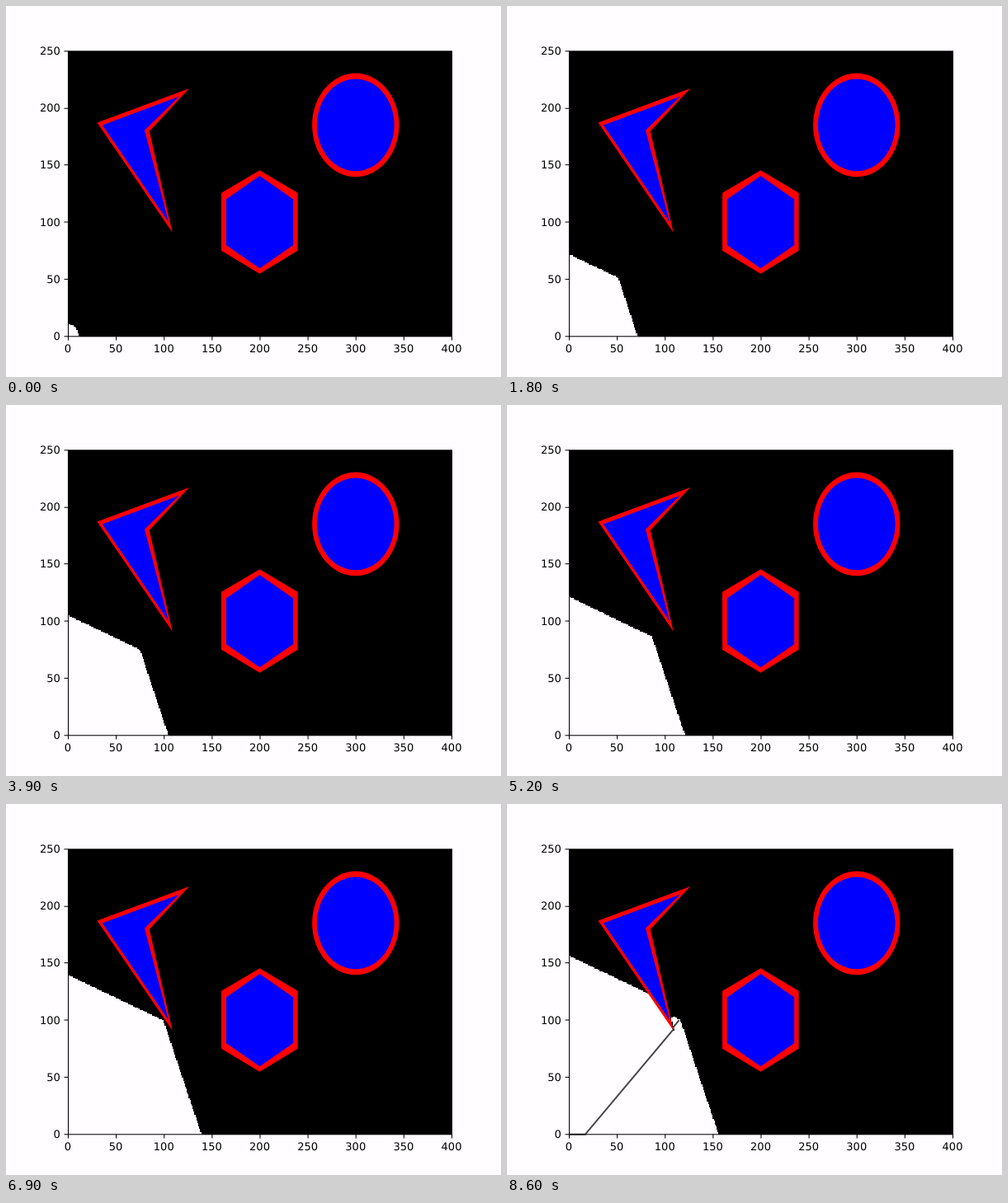
Write an HTML page with a canvas that moves like this. It is 600 px wide and 450 px high and loops after 9700 ms.

```html
<!DOCTYPE html>
<html lang="en">
<head>
<meta charset="utf-8">
<title>Shortest path search</title>
<style>
  html, body { margin: 0; width: 100%; height: 100%; overflow: hidden; background: #fffdff; }
  canvas { position: absolute; left: 75px; top: 54px; width: 465px; height: 347px; clip-path: inset(1px 0 0 0); image-rendering: pixelated; background: #000; }
  svg { position: absolute; left: 0; top: 0; }
  text { font: 13.02px "DejaVu Sans", sans-serif; text-rendering: geometricPrecision; }
</style>
</head>
<body>
<canvas id="grid" width="400" height="250"></canvas>
<svg width="600" height="450" viewBox="0 0 600 450">
  <g transform="translate(75 400.8) scale(1.1625 -1.386)">
    <g fill="#f00">
      <polygon id="arrow" points="30.5,187 126.5,217 85,179.5 109,91"/>
      <polygon points="200,145.5 239.7,125.5 239.7,75 200,54.8 160,75 160,125.5"/>
      <circle cx="300" cy="185" r="45.3"/>
    </g>
    <g fill="#00f">
      <polygon points="36,185 116,210 80,180.5 105,100"/>
      <polygon points="200,140.5 235,120 235,80 200,59.5 165,80 165,120"/>
      <circle cx="300" cy="185" r="40.3"/>
    </g>
    <polyline id="route" points="0,0 17,0 109,92 109,94 115,100" fill="none"
      stroke="#444" stroke-width="2" vector-effect="non-scaling-stroke"/>
  </g>
  <rect x="75.47" y="54.84" width="465" height="345.94" fill="none" stroke="#000" stroke-width="1.04"/>
  <g id="ticks" stroke-width="1.04"></g>
</svg>
<script>
const W = 400, H = 250, STEP = 100, LOOP = 9700, LAST = 86;
const GOAL = 100 * W + 115;
const STRAIGHT = 10, DIAGONAL = 14;
const ctx = document.getElementById('grid').getContext('2d');
const route = document.getElementById('route');

// The plot was laid out on a 640 pixel wide grid and scaled to 600.
const snap = p => (Math.round(p / 0.9375) + 0.5) * 0.9375;

function drawTicks() {
  let out = '';
  for (let v = 0; v <= W; v += 50) {
    const x = 75 + v * 1.1625;
    out += `<path d="M${snap(x)} 400.8v4.6" stroke="#000"/><text x="${x}" y="419.7" text-anchor="middle">${v}</text>`;
  }
  for (let v = 0; v <= H; v += 50) {
    const y = 400.5 - v * 1.386;
    out += `<path d="M75.4 ${snap(y)}h-4.9" stroke="#000"/><text x="65.9" y="${y + 4.7}" text-anchor="end">${v}</text>`;
  }
  document.getElementById('ticks').innerHTML = out;
}

// Dijkstra with buckets as wide as the cheapest edge, so a bucket never feeds itself.
function searchOrder() {
  const obstacle = new Path2D('M' + document.getElementById('arrow').getAttribute('points') + 'Z');
  const cost = new Float64Array(W * H).fill(Infinity);
  const done = new Uint8Array(W * H);
  const buckets = [[0]], order = [];
  cost[0] = 0;
  for (let b = 0; b < buckets.length; b++) {
    const cells = (buckets[b] || []).sort((p, q) => cost[p] - cost[q] || p % W - q % W);
    for (const cell of cells) {
      if (done[cell]) continue;
      done[cell] = 1;
      order.push(cell);
      if (cell === GOAL) return order;
      const cx = cell % W, cy = Math.floor(cell / W);
      for (let dy = -1; dy <= 1; dy++) for (let dx = -1; dx <= 1; dx++) {
        const x = cx + dx, y = cy + dy, next = y * W + x;
        if (x < 0 || y < 0 || x >= W || y >= H || done[next]) continue;
        const total = cost[cell] + (dx && dy ? DIAGONAL : STRAIGHT);
        if (total >= cost[next] || ctx.isPointInPath(obstacle, x, y)) continue;
        cost[next] = total;
        (buckets[Math.floor(total / STRAIGHT)] ||= []).push(next);
      }
    }
  }
  return order;
}

drawTicks();
const order = searchOrder();
let shown = -1;

function render(step) {
  ctx.clearRect(0, 0, W, H);
  ctx.fillStyle = '#fffdff';
  const count = Math.min(order.length, 100 + 200 * step);
  for (let i = 0; i < count; i++) {
    ctx.fillRect(order[i] % W, H - 1 - Math.floor(order[i] / W), 1, 1);
  }
  route.style.display = step === LAST ? '' : 'none';
}

const start = performance.now();
function tick() {
  const time = (performance.now() - start) % LOOP;
  const step = Math.min(LAST, Math.floor(time / STEP));
  if (step !== shown) render(shown = step);
  requestAnimationFrame(tick);
}
tick();
</script>
</body>
</html>
```
